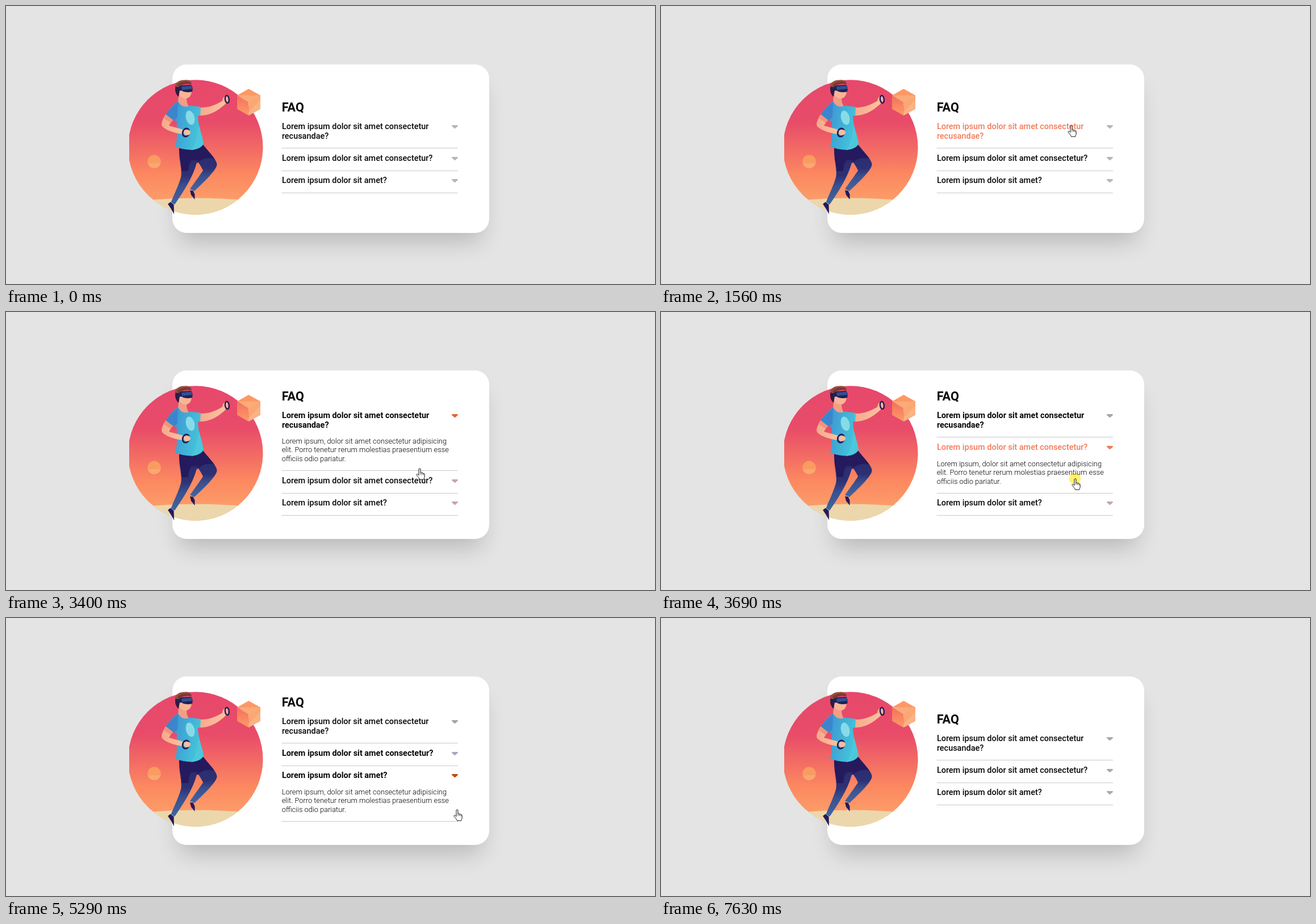
An HTML page for the animation above (8230 ms loop, 1143 px wide and 490 px high).

```html
<!DOCTYPE html>
<html lang="en">
<head>
<meta charset="utf-8">
<title>FAQ accordion</title>
<style>
  html, body { margin: 0; width: 100%; height: 100%; overflow: hidden; background: #e4e4e4; }
  .card {
    position: absolute; left: 293px; top: 103px; width: 558px; height: 296.5px;
    border-radius: 25px; background: #fff;
    box-shadow: 0 27px 40px -13px rgba(0, 0, 0, .2);
  }
  svg { position: absolute; left: 0; top: 0; display: block; }
  text { font-family: Roboto, sans-serif; fill: #080808; }
  .title { font-size: 21.6px; font-weight: 700; }
  .question { font-size: 14.45px; font-weight: 500; }
  .answer { font-size: 12.83px; font-weight: 300; fill: #000; }
  .rule { fill: #c9c9c9; }
  #click { fill: #fff36b; mix-blend-mode: multiply; }
</style>
</head>
<body>
<div class="card"></div>
<svg width="1143" height="490" viewBox="0 0 1143 490">
  <defs>
    <linearGradient id="sky" x1="0" y1="0" x2="0" y2="1">
      <stop offset="0" stop-color="#e7486b"/>
      <stop offset=".32" stop-color="#e84c69"/>
      <stop offset=".7" stop-color="#fc8860"/>
      <stop offset="1" stop-color="#fda86e"/>
    </linearGradient>
    <linearGradient id="shirt" x1="0" y1="0" x2="1" y2=".25">
      <stop offset=".15" stop-color="#3d90d2"/>
      <stop offset=".9" stop-color="#43bfd9"/>
    </linearGradient>
    <linearGradient id="skin" x1="0" y1="0" x2="1" y2="0">
      <stop offset="0" stop-color="#f6a98b"/>
      <stop offset="1" stop-color="#fbc3a0"/>
    </linearGradient>
    <linearGradient id="leg" x1="0" y1="0" x2="0" y2="1">
      <stop offset=".25" stop-color="#251a5e"/>
      <stop offset=".29" stop-color="#2b2d70"/>
      <stop offset=".52" stop-color="#2d3174"/>
      <stop offset=".7" stop-color="#3a5190"/>
      <stop offset="1" stop-color="#4265a2"/>
    </linearGradient>
    <linearGradient id="side" x1="0" y1="0" x2="0" y2="1">
      <stop offset="0" stop-color="#f3705f"/>
      <stop offset="1" stop-color="#fd9c65"/>
    </linearGradient>
    <clipPath id="disc"><circle cx="333.700" cy="249" r="118.800"/></clipPath>
    <clipPath id="edge"><rect x="217" y="120" width="240" height="260"/></clipPath>
  </defs>

  <g clip-path="url(#edge)">
    <g clip-path="url(#disc)">
      <rect x="214" y="130" width="240" height="238" fill="url(#sky)"/>
      <path d="M240 343Q334 334 430 343V370H240Z" fill="#ecd7ac"/>
    </g>
    <circle cx="261" cy="274.300" r="11.800" fill="#fa9b61"/>
    <path d="M249.600 277H272.400A11.800 11.800 0 0 1 249.600 277Z" fill="#f9a870"/>
  </g>

  <g id="cube">
    <path d="M427.300 146L448 157.500L427.300 169.500L407 157.500Z" fill="#fd9865"/>
    <path d="M408 157.500H448L427.300 169.500Z" fill="#f9ab79"/>
    <path d="M407 157.500L427.300 169.500V193L407 181.500Z" fill="url(#side)"/>
    <path d="M448 157.500L427.300 169.500V193L448 181.500Z" fill="#fba673"/>
    <path d="M448 165L427.300 187V193L448 181.500Z" fill="#f9b384"/>
  </g>

  <g id="player">
    <path d="M346 243C355 255 371 270 371.500 279C372 288 350 309 332 326L324 322.500C333 310 341 299 347 290C344 283 340 277 334 270Z" fill="url(#leg)"/>
    <path d="M346 243C352 252 361 261 367 269C356 266 344 269 337 277L330 268Z" fill="#251a5e"/>
    <path d="M324 325L329.500 325.500L332.500 332V341L326 333Z" fill="#241a5c"/>
    <path d="M305 247L347 243C347 258 340 268 336 276C329 303 311 329 297 350L290.500 346C297 330 304 316 308 302C311 288 304 274 305 247Z" fill="url(#leg)"/>
    <path d="M305 247L347 242C348 255 343 263 338 269C328 265 322 275 321 291H309.500C309 276 305 262 305 247Z" fill="#251a5e"/>
    <path d="M289.500 345.500L295.500 350L296 367L291 358L285 349Z" fill="#241a5c"/>

    <path d="M339 179C357 180 370 174 383 166L387 172C376 182 361 194 340 193Z" fill="url(#skin)"/>
    <path d="M381 166C382 160 387 157 391 159C394 164 391 171 386 172Z" fill="#f9b695"/>
    <ellipse cx="389.300" cy="164.500" rx="3.400" ry="6.700" fill="none" stroke="#211a58" stroke-width="2.400" transform="rotate(-8 389 164)"/>

    <path d="M304 157L318 162C318 168 319 173 322 177C315 180 307 177 303 171Z" fill="#f29e86"/>
    <path d="M302 146L327 149C327 157 323 163 316 163C308 162 302 157 302 146Z" fill="#f8b596"/>
    <path d="M303 168C309 178 316 179 324 175.500L343 178L342 193L338 194C338 211 346 227 348 243C341 256 318 256 298 248C303 233 300 217 301 204L281 192C288 181 294 174 303 168Z" fill="url(#shirt)"/>
    <path d="M340 211C343 222 346 233 348 243C343 250 335 253 326 254C337 241 335 226 340 211Z" fill="#4bc8dc"/>
    <path d="M303 169C296 175 287 184 281 192L296 202L302 196Z" fill="#3c85cc"/>
    <ellipse cx="324.500" cy="197" rx="7.600" ry="12.800" fill="#87dbe8" transform="rotate(-14 324.500 197)"/>

    <path d="M281 191L294 201C290 205 288 209 287 211L313 218L314 226C299 225 281 219 275 212C272 207 277 198 281 191Z" fill="url(#skin)"/>
    <path d="M281 191L294 201L290 206L278 198Z" fill="#ef947b"/>
    <ellipse cx="317" cy="223" rx="5.700" ry="7.300" fill="none" stroke="#221b5c" stroke-width="2.800" transform="rotate(18 317 223)"/>
    <path d="M313 220C317 217 324 217 325 222C325 227 320 229 315 227Z" fill="#fabd9d"/>

    <path d="M299 139L308 137L304 160C300 157 296 150 299 139Z" fill="#35183f"/>
    <path d="M297 142C299 134 306 130 314 130.500C322 129 328 133 327 138C318 136 311 137 304 143Z" fill="#9a4c3a"/>
    <path d="M302 139C308 133 316 132 324 134L327 138C317 136 310 138 304 143Z" fill="#7b3835"/>
    <path d="M300 146L309 140L326 139C329 142 329 147 328 151C321 153 313 152 309 149L300 150Z" fill="#20205a"/>
    <path d="M309 142L327 140.500L328 146L310 148Z" fill="#34508d"/>
  </g>

  <text class="title" id="title" x="485.800">FAQ</text>
  <g id="list"></g>
  <circle id="click" r="10.300"/>
  <g id="cursor" stroke="#111" fill="#fff" stroke-linejoin="round">
    <g id="hand" transform="translate(-6 0)">
      <path d="M5 2C5 .3 8 .3 8 2V8.500C8.500 7.400 10.700 7.500 10.900 9C11.600 8.100 13.200 8.500 13.300 10C14.100 9.400 15.200 9.900 15.200 11.200V15C15.200 17.500 13.800 18 13.800 20.200H6.500C6.300 18.200 3 15 1.200 12.600C.3 11.200 2 9.900 3.400 11.200L5 12.800Z"/>
      <path d="M8 8.500V11.500M10.700 9V12M13.200 10V12.500" fill="none" stroke-width=".8"/>
    </g>
    <path id="pointer" d="M.5 .5V16L4 12.700L6.500 18.500L8.800 17.500L6.400 11.800H11.500Z"/>
  </g>
</svg>

<script>
const LOOP = 8230, STEP = 66.95, START = 600;
const DARK = [8, 8, 8], ORANGE = [243, 122, 88];
const $ = id => document.getElementById(id);

const ANSWER = ['Lorem ipsum, dolor sit amet consectetur adipisicing',
  'elit. Porro tenetur rerum molestias praesentium esse', 'officiis odio pariatur.'];
const LINE_Y = [0, 15, 31];

// Positions while closed; hover entries are fade in from/to, fade out from/to.
const ITEMS = [
  { lines: ['Lorem ipsum dolor sit amet consectetur', 'recusandae?'], y: 217, rule: 250, answerY: 262,
    hover: [1140, 1405, 3010, 3220], bold: [2150, 3820] },
  { lines: ['Lorem ipsum dolor sit amet consectetur?'], y: 273, rule: 290, answerY: 302,
    hover: [3400, 3610, 3720, 3885], bold: [3890, 5500] },
  { lines: ['Lorem ipsum dolor sit amet?'], y: 312, rule: 329, answerY: 341,
    hover: [6570, 6825, 7250, 7560], bold: [5290, 6690] }
];

// Start time, open item (0 for none), arrow colours.
const STATES = [
  [0, 0, ['#bfb3b3', '#bfb3b3', '#bfb3b3']],
  [2020, 1, ['#e0662f', '#cba3b0', '#cba3b0']],
  [3620, 2, ['#aca3aa', '#f07a55', '#cba3b0']],
  [5160, 3, ['#a8a3a5', '#a4abba', '#c04a10']],
  [6490, 0, ['#aaa', '#aaa', '#aaa']]
];
const CLICK_TIME = 130;

const smooth = x => x * x * (3 - 2 * x);
const easeIn = x => x * x;
const easeOut = x => 1 - (1 - x) ** 2;
const PATH = [
  [600, 1082, 462], [1403, 728, 212, easeOut], [1555, 722, 210], [2885, 722, 210],
  [2943, 724, 211], [3612, 729, 293], [4350, 729, 293], [4950, 794, 337],
  [6150, 794, 337], [6285, 765, 323], [7230, 765, 323], [7560, 1078, 469, easeIn]
];
const HIDE = 7600;

function add(parent, tag, attrs, text) {
  const el = document.createElementNS('http://www.w3.org/2000/svg', tag);
  for (const key in attrs) el.setAttribute(key, attrs[key]);
  if (text) el.textContent = text;
  return parent.appendChild(el);
}

for (const item of ITEMS) {
  item.head = add($('list'), 'g', {});
  item.texts = item.lines.map((line, i) =>
    add(item.head, 'text', { class: 'question', x: 485.9, y: item.y + 17 * i }, line));
  item.arrow = add(item.head, 'path', {
    transform: `translate(785 ${item.y - 7})`,
    d: 'M1 0H10Q11.8 .5 10.8 1.7L6.3 5.8Q5.500 6.400 4.700 5.800L.2 1.7Q-.8 .5 1 0Z'
  });
  item.line = add($('list'), 'rect', { class: 'rule', x: 485.5, width: 310.5, height: 1 });
  item.body = add($('list'), 'g', { transform: 'translate(0 -30)' });
  ANSWER.forEach((line, i) =>
    add(item.body, 'text', { class: 'answer', x: 485.7, y: item.answerY + LINE_Y[i] }, line));
}

const ramp = (t, a, b) => smooth(Math.min(1, Math.max(0, (t - a) / (b - a))));
const mix = k => `rgb(${DARK.map((c, i) => Math.round(c + (ORANGE[i] - c) * k))})`;

function place(t) {
  const i = PATH.findIndex(key => key[0] > t);
  if (i < 0) return PATH[PATH.length - 1].slice(1, 3);
  if (i === 0) return PATH[0].slice(1, 3);
  const [t0, x0, y0] = PATH[i - 1], [t1, x1, y1, ease = smooth] = PATH[i];
  const k = ease((t - t0) / (t1 - t0));
  return [x0 + (x1 - x0) * k, y0 + (y1 - y0) * k];
}

function draw(t) {
  // The pointer and colour fades advance in fixed steps.
  const q = START + Math.floor((t - START + 20) / STEP) * STEP;
  const [since, open, arrows] = STATES.filter(s => s[0] <= t).pop();

  $('title').setAttribute('y', open ? 156 : 186);
  ITEMS.forEach((item, i) => {
    const headShift = !open ? 0 : i < open ? -30 : 29;
    const ruleShift = !open ? 0 : i < open - 1 ? -30 : 29;
    const [a, b, c, d] = item.hover;
    const color = mix(ramp(q, a, b) - ramp(q, c, d));
    const weight = t >= item.bold[0] && t < item.bold[1] ? 700 : 500;
    item.head.setAttribute('transform', `translate(0 ${headShift})`);
    item.line.setAttribute('y', item.rule + ruleShift);
    item.arrow.setAttribute('fill', arrows[i]);
    item.body.style.display = open === i + 1 ? '' : 'none';
    for (const el of item.texts) {
      el.style.fill = color;
      el.style.fontWeight = weight;
    }
  });

  const [x, y] = place(q).map(Math.round);
  const hand = x < 800;
  $('cursor').style.display = t >= START && t < HIDE ? '' : 'none';
  $('cursor').setAttribute('transform', `translate(${x} ${y})`);
  $('hand').style.display = hand ? '' : 'none';
  $('pointer').style.display = hand ? 'none' : '';
  $('click').style.display = since && t < since + CLICK_TIME ? '' : 'none';
  $('click').setAttribute('cx', x);
  $('click').setAttribute('cy', y + .5);
}

const origin = performance.now();
function tick() {
  draw((performance.now() - origin) % LOOP);
  requestAnimationFrame(tick);
}
tick();
</script>
</body>
</html>
```
